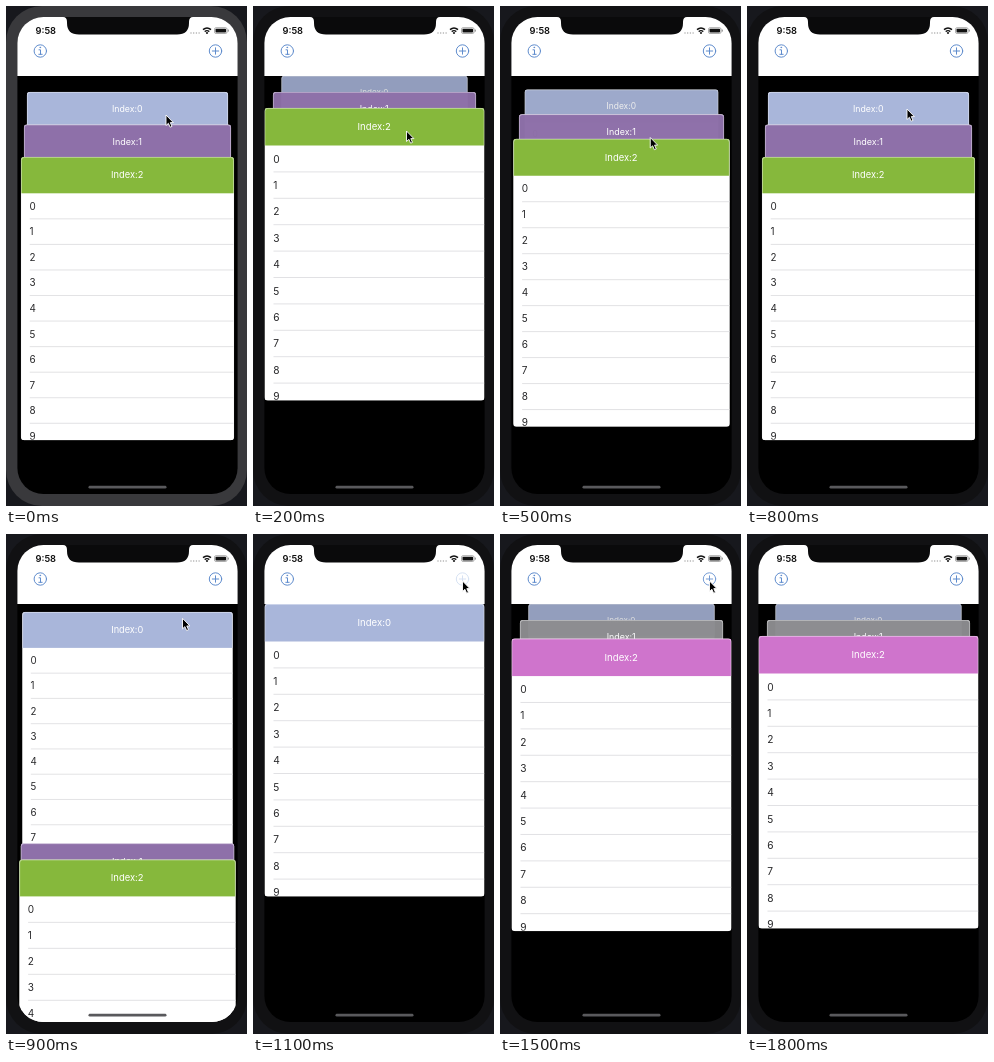
An HTML page for the animation above (2000 ms loop, 241 by 500 pixels).

```html
<!DOCTYPE html>
<html lang="en">
<head>
<meta charset="utf-8">
<title>Card stack</title>
<style>
html, body { margin: 0; width: 100%; height: 100%; overflow: hidden; background: #17181d; }
svg { display: block; width: 241px; height: 500px; }
text { font-family: Inter, "Open Sans", sans-serif; }
.title { font-size: 9.6px; fill: #fff; text-anchor: middle; }
.row { font-size: 10.2px; fill: #28282a; }
.sep { stroke: #dadadd; stroke-width: .8; }
.edge { fill: none; stroke: #fff; stroke-opacity: .55; stroke-width: .8; }
.icon { fill: none; stroke: #5f8ccd; stroke-linecap: round; }
</style>
</head>
<body>
<svg viewBox="0 0 241 500">
  <defs>
    <clipPath id="screen"><rect x="11.400" y="11" width="220.200" height="477" rx="26"/></clipPath>
    <clipPath id="card"><rect width="220" height="292.500" rx="3"/></clipPath>
  </defs>
  <rect width="241" height="500" fill="#17181d"/>
  <rect id="bezel" width="241" height="500" rx="36"/>
  <g clip-path="url(#screen)">
    <rect width="241" height="500"/>
    <rect width="241" height="70" fill="#fff"/>
    <path d="M57 10V11Q61 11 61 16V17Q61 28.500 73 28.500H171Q183 28.500 183 17V16Q183 11 187 11V10Z" fill="#0a0a0b"/>
    <g id="cards"></g>
  </g>
  <text x="29.500" y="27.700" font-size="9.300" font-weight="600" fill="#111">9:58</text>
  <path d="M185 27H194" stroke="#aaa" stroke-width="1.500" stroke-linecap="round" stroke-dasharray="0 2.700"/>
  <g fill="none" stroke="#111" stroke-width="1.400">
    <path d="M197 23.600Q201 20.200 205 23.600M198.700 25.600Q201 23.700 203.300 25.600"/>
    <circle cx="201" cy="27" r=".4"/>
  </g>
  <rect x="208.500" y="21.700" width="12.600" height="5.800" rx="1.600" fill="none" stroke="#888" stroke-width=".7"/>
  <rect x="209.500" y="22.700" width="10.600" height="3.800" rx=".8" fill="#111"/>
  <path d="M222.300 23.600v2" stroke="#888"/>
  <g class="icon">
    <circle cx="34.300" cy="45" r="6.200"/>
    <path d="M33 43.800H34.500V48.300M32.800 48.300H36.200"/>
    <circle cx="34.200" cy="41.400" r=".4"/>
  </g>
  <g class="icon" id="plus">
    <circle cx="209.500" cy="45" r="6.200"/>
    <path d="M206.300 45H212.700M209.500 41.800V48.200"/>
  </g>
  <rect x="82.500" y="479.800" width="78" height="2.800" rx="1.400" fill="#59595c"/>
  <path id="cursor" d="M0 0V10.500L2.400 8.300L4.100 12.200L6 11.400L4.300 7.600H7.400Z" fill="#000" stroke="#fff" stroke-width=".9"/>
</svg>
<script>
const LOOP = 2000, STEP = 100;
const W = 220, H = 292.5, HEAD = 37.5, ROW = 26.4, CX = 121.5, OFF = 500;
const $ = id => document.getElementById(id);
const mix = (a, b, p) => a + (b - a) * p;
const ramp = (t, from, to) => Math.min(1, Math.max(0, (t - from) / (to - from)));

function add(parent, tag, attrs, text) {
  const el = document.createElementNS('http://www.w3.org/2000/svg', tag);
  for (const k in attrs) el.setAttribute(k, attrs[k]);
  if (text !== undefined) el.textContent = text;
  return parent.appendChild(el);
}

function makeCard(n, color) {
  const g = add($('cards'), 'g', {});
  const body = add(g, 'g', { 'clip-path': 'url(#card)' });
  add(body, 'rect', { width: W, height: H, fill: '#fff' });
  add(body, 'rect', { width: W, height: HEAD, fill: color });
  add(body, 'text', { class: 'title', x: W / 2 - .3, y: 22.2 }, 'Index:' + n);
  for (let i = 0; i < 10; i++) {
    const y = HEAD + ROW * i;
    add(body, 'text', { class: 'row', x: 8.7, y: y + 17 }, i);
    add(body, 'path', { class: 'sep', d: `M9 ${y + ROW}H${W}` });
  }
  add(g, 'rect', { class: 'edge', x: .4, y: .4, width: W - .8, height: H - .8, rx: 3 });
  return g;
}

const blue = makeCard(0, '#a9b6da');
const firstDeck = [blue, makeCard(1, '#8e70a9'), makeCard(2, '#86b83c')];
const secondDeck = [blue, makeCard(1, '#8d8d90'), makeCard(2, '#cf74cc')];

function place(el, y, scale, alpha = 1) {
  el.setAttribute('transform', `translate(${CX - W * scale / 2} ${y}) scale(${scale})`);
  el.setAttribute('opacity', alpha);
}

const stackY = i => 70 + 16 * i;
const stackScale = depth => 1 - .077 * depth;
const stackAlpha = depth => 1 - .033 * depth * depth;

// The open fan closes, is pulled down, opens again, then all but one card drop out
function drawFirst(t) {
  const fan = 1 - ramp(t, 0, 200) + ramp(t, 400, 600);
  const pull = ramp(t, 200, 400) - ramp(t, 400, 600);
  const leave = ramp(t, 800, 1000);
  firstDeck.forEach((el, i) => {
    const y = mix(stackY(i) + pull * (22 + 1.7 * i), 86 + 32.5 * i, fan);
    const scale = mix(stackScale(2 - i), .914 + .027 * i, fan);
    const alpha = mix(stackAlpha(2 - i), 1, fan);
    place(el, mix(y, i ? OFF : stackY(0), leave), mix(scale, 1, leave), alpha);
  });
}

// Each press of plus slides a card up and sends the others one step back
const pressTime = i => 880 + 220 * i;
const push = (t, i) => 1 - (1 - ramp(t, pressTime(i), pressTime(i) + 300)) ** 5.5;

function drawSecond(t) {
  let depth = 0;
  for (let i = 2; i >= 0; i--) {
    const p = i ? push(t, i) : 1;
    place(secondDeck[i], mix(OFF, stackY(i), p), stackScale(depth), stackAlpha(depth));
    depth += p;
  }
}

function plusAlpha(t) {
  const i = t < pressTime(2) ? 1 : 2;
  return t < pressTime(1) ? 1 : mix(.25, 1, ramp(t, pressTime(i), pressTime(i) + 220));
}

// Stops of the pointer: time, x, y
const stops = [[0, 160, 109], [400, 147, 141], [800, 160, 103], [1100, 209.5, 47],
  [1600, 209.5, 47], [1800, 235, 70]];

function drawCursor(t) {
  const next = stops.findIndex(s => s[0] > t);
  $('cursor').style.display = next < 0 ? 'none' : '';
  if (next < 0) return;
  const a = stops[next - 1], b = stops[next], p = ramp(t, a[0], b[0]);
  $('cursor').setAttribute('transform', `translate(${mix(a[1], b[1], p)} ${mix(a[2], b[2], p)})`);
}

function draw(t) {
  drawSecond(t);
  if (t <= 1000) drawFirst(t);
  else firstDeck.slice(1).forEach(el => place(el, OFF, 1));
  drawCursor(t);
  $('plus').setAttribute('opacity', plusAlpha(t));
  $('bezel').setAttribute('fill', t < STEP ? '#39393c' : '#111113');
}

const start = performance.now();
function tick() {
  const t = (performance.now() - start) % LOOP;
  draw(Math.floor(t / STEP) * STEP);
  requestAnimationFrame(tick);
}
tick();
</script>
</body>
</html>
```
